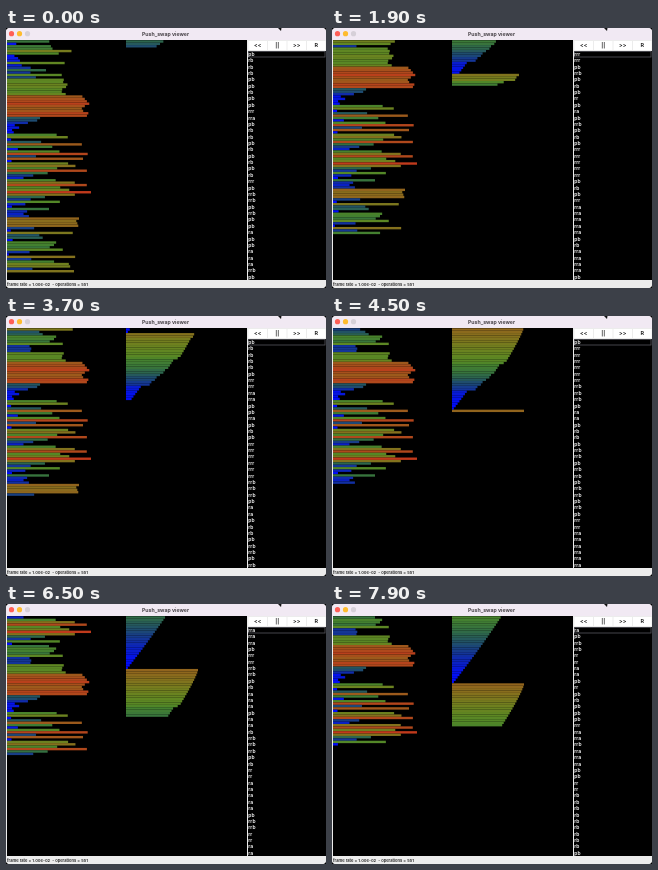
These frames come from a looping animation (320 px wide and 260 px high, 8000 ms). An HTML page with a canvas:

```html
<!DOCTYPE html>
<html lang="en">
<head>
<meta charset="utf-8">
<title>Push_swap viewer</title>
<style>
html, body { margin: 0; width: 100%; height: 100%; overflow: hidden; background: #000; }
canvas { display: block; border-radius: 4px; background: #ececec; }
</style>
</head>
<body>
<canvas width="320" height="260"></canvas>
<script>
const ctx = document.querySelector('canvas').getContext('2d');
const FONT = 'Inter, "Liberation Sans", sans-serif';
const ROW = 2.393, TOP = 12.3, LONGEST = 84;

// A trailing digit repeats the operation
const ops = `
  pb rb3 pb2 rb pb2 rrr rra pb rb2 pb rb pb rb pb rb rrr pb rrb2 pb
  rrb pb2 ra pb2 ra3 rrb pb rrr3 pb
  rrr3 pb rrb pb rb pb rr pb ra pb rrb pb rb pb rrr5 pb rb
  pb rrr rra5 pb rb rra4 pb rb4 pb rrr2 rra2 pb2 rra pb rb
  pb rrr6 rrb3 pb ra2 pb rb2 pb rrb2 pb rrb2 pb rrb2 pb rrb pb rrr2 rra10
  rra3 pb rrr2 rrb2 pb rb ra3 pb ra2 rb rrb3 pb rb rr2 ra4
  ra pb rrb2 rr2 ra2 pb rr pb rb pb3 rrr rra2 rrb rra3 pb2 rr2 rb9 pb
`.trim().split(/\s+/).flatMap(s => {
  const [, op, n] = s.match(/([a-z]+)(\d*)/);
  return Array(+n || 1).fill(op);
});

// [tick of 100 ms, operation at the head of the list]
const pace = [[0, 0], [11, 25], [30, 63], [45, 91], [79, 159]];

function opAt(tick) {
  const i = Math.max(1, pace.findIndex(p => p[0] >= tick));
  const [t0, n0] = pace[i - 1], [t1, n1] = pace[i];
  return Math.floor(n0 + (n1 - n0) * (tick - t0) / (t1 - t0));
}

const up = s => s.push(s.shift());
const down = s => s.unshift(s.pop());

// Both stacks as element ids; the head operation is already done
function stacks(head) {
  const a = Array.from({ length: 100 }, (_, i) => i);
  const b = a.splice(0, 3);
  for (const op of ops.slice(1, head + 1)) {
    if (op === 'pb') b.unshift(a.shift());
    if (op === 'ra' || op === 'rr') up(a);
    if (op === 'rb' || op === 'rr') up(b);
    if (op === 'rra' || op === 'rrr') down(a);
    if (op === 'rrb' || op === 'rrr') down(b);
  }
  return [a, b];
}

let seed = 11;
function random(low, high) {
  seed = seed * 16807 % 2147483647;
  return low + (high - low) * seed / 2147483647;
}

// Lengths follow from the last state: b is a rotated descending ramp,
// a is random within runs of [rows, shortest, longest]
function measure() {
  const [a, b] = stacks(pace[pace.length - 1][1]);
  const lengths = [], size = b.length, cut = 28;
  b.forEach((id, i) => {
    const rank = (i - cut + size) % size;
    lengths[id] = 72 * (1 - (rank / size) ** 1.2);
  });
  const runs = [[5, 42, 58], [3, 16, 32], [4, 53, 61], [9, 74, 84],
    [3, 12, 50], [4, 5, 14], [26, 3, 84]];
  let row = 0;
  for (const [rows, low, high] of runs)
    for (let i = 0; i < rows; i++) lengths[a[row++]] = random(low, high);
  return lengths;
}
const lengths = measure();

function color(len) {
  const v = len / LONGEST;
  const r = 192 * v ** 1.8;
  const g = 135 * Math.exp(-(((v - 0.65) / 0.38) ** 2));
  const b = 28 + 227 * Math.exp(-((v / 0.36) ** 2));
  return `rgb(${[r, g, b].map(Math.round)})`;
}

function rect(x, y, w, h, fill) {
  ctx.fillStyle = fill;
  ctx.fillRect(x, y, w, h);
}

function text(s, x, y, font, fill, align = 'left') {
  ctx.font = `${font} ${FONT}`;
  ctx.fillStyle = fill;
  ctx.textAlign = align;
  ctx.fillText(s, x, y);
}

function bars(stack, x) {
  stack.forEach((id, i) =>
    rect(x, TOP + i * ROW, lengths[id], ROW, color(lengths[id])));
}

function frame() {
  rect(0, 0, 320, 260, '#ececec');
  rect(0, 0, 320, 12, '#f1e9f3');
  ['#ff5f57', '#febc2e', '#d6d0d8'].forEach((c, i) => {
    ctx.fillStyle = c;
    ctx.beginPath();
    ctx.arc(5.5 + 8 * i, 5.7, 2.6, 0, 7);
    ctx.fill();
  });
  text('Push_swap viewer', 159.5, 7.7, '700 5.2px', '#484348', 'center');
  ctx.fillStyle = '#111';
  ctx.beginPath();
  ctx.moveTo(272, 0);
  ctx.lineTo(275.5, 0);
  ctx.lineTo(275, 3);
  ctx.fill();

  rect(1, 12, 240, 240, '#000');
  rect(242, 23, 78, 229, '#000');
  ['<<', '||', '>>', 'R'].forEach((s, i) => {
    const x = 242.5 + 19.5 * i;
    rect(x, 13, 18.5, 9, '#fff');
    text(s, x + 9.2, 19.3, '600 5.4px', '#111', 'center');
  });
  ctx.strokeStyle = '#55555c';
  ctx.lineWidth = 0.8;
  ctx.strokeRect(242.5, 23.5, 76.5, 5.5);
  text('frame rate = 1.00e-02  - operations = 551', 1, 258, '600 4.1px', '#222');
}

function draw(now) {
  const head = opAt(Math.floor(now % 8000 / 100));
  const [a, b] = stacks(head);
  frame();
  bars(a, 1);
  bars(b, 120);
  ops.slice(head, head + 36).forEach((op, i) =>
    text(op, 242.3, 27.8 + 6.37 * i, '600 5px', '#fff'));
  requestAnimationFrame(() => draw(performance.now() - start));
}

const start = performance.now();
draw(0);
</script>
</body>
</html>
```
